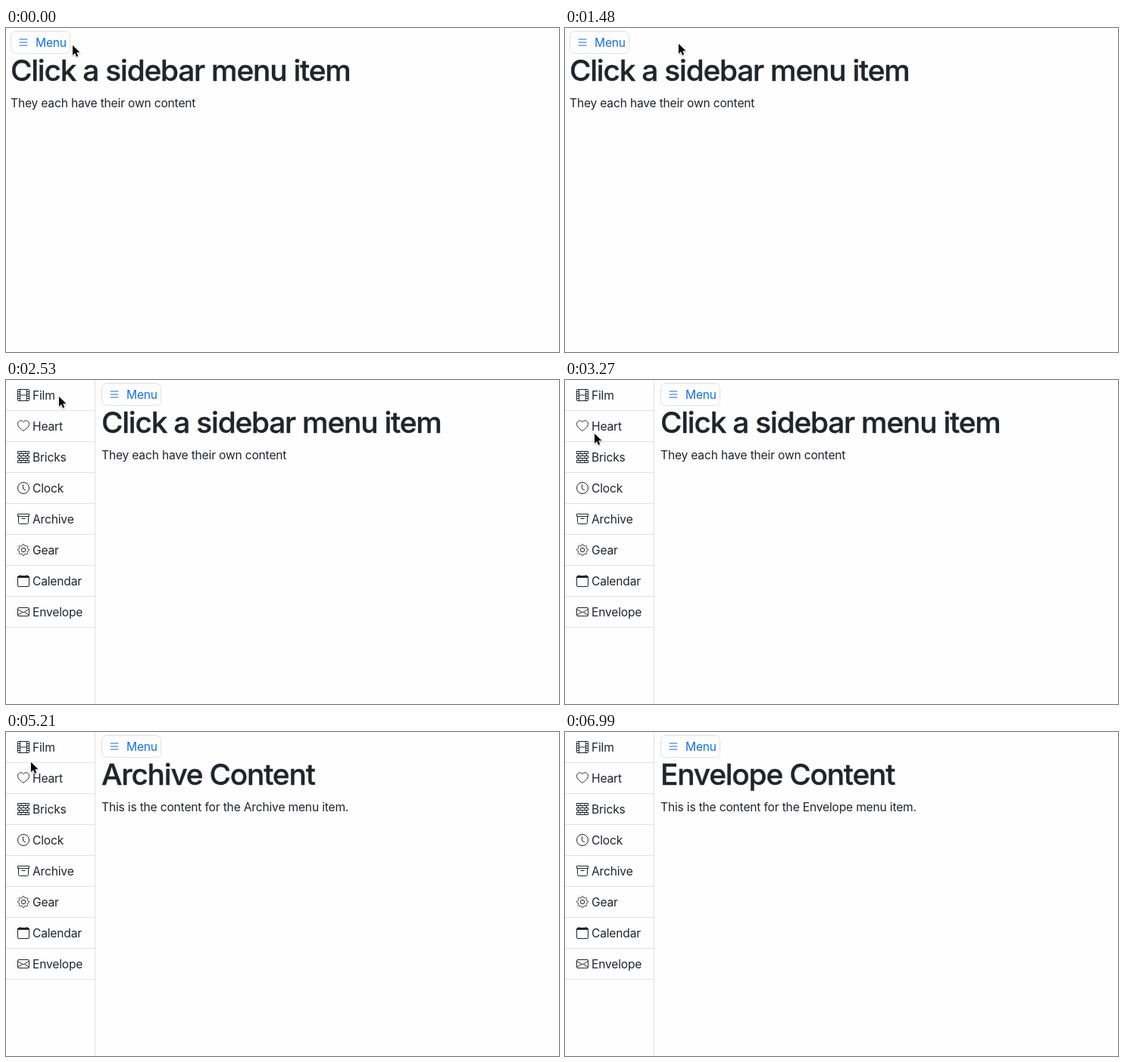
These frames come from a looping animation (730 by 429 pixels, 8190 ms). An HTML page:

```html
<!DOCTYPE html>
<html lang="en">
<head>
<meta charset="utf-8">
<title>Sidebar menu</title>
<style>
  html, body { margin: 0; width: 100%; height: 100%; overflow: hidden; background: #fefefe; }
  svg { display: block; }
  text {
    font: 400 15.55px Inter, "Open Sans", sans-serif;
    font-optical-sizing: none;
    letter-spacing: -.16px;
    fill: #212529;
    white-space: pre;
  }
  #title {
    font-size: 38.8px;
    font-weight: 500;
    letter-spacing: -1.18px;
    stroke: #212529;
    stroke-width: .35;
  }
  .icon { fill: none; stroke: #212529; stroke-width: 1; }
  .rule { fill: none; stroke: #dee2e6; }
  #button text { fill: var(--link); }
  #button .icon { stroke: var(--link); stroke-linecap: round; }
  #pointer { filter: drop-shadow(0 1px 1px rgba(0, 0, 0, .3)); }
  #arrow { fill: #000; stroke: #fff; stroke-width: 1.6; stroke-linejoin: round; paint-order: stroke; }
  #hand { fill: #fff; stroke: #000; stroke-width: 1.1; stroke-linejoin: round; }
  #beam { fill: none; stroke: #000; }
  #beam .halo { stroke: #fff; stroke-width: 2.4; }
</style>
</head>
<body>
<svg width="730" height="429" viewBox="0 0 730 429">
  <g id="sidebar"><path class="rule" d="M117.5 0V429"/></g>
  <g id="page">
    <g id="button">
      <rect class="rule" x="6.5" y="4.5" width="78" height="29" rx="6"/>
      <path class="icon" d="M18 15H28M18 19H28M18 23H28"/>
      <text x="39" y="25">Menu</text>
    </g>
    <text id="title" x="6" y="70"></text>
    <text id="body" x="6" y="105"></text>
  </g>
  <g id="pointer">
    <path id="arrow" transform="scale(.9)" d="M0 0V14.5L3.4 11.3 5.7 16.6 8 15.6 5.8 10.4H10.5Z"/>
    <g id="hand" transform="translate(-4 -1)">
      <path d="M4 10.6L2.6 2.6C2.4.9 4.6.4 5.2 2L6.6 6.6C7 5.6 9 5.7 9.2 7 9.8 6.2 11.4 6.5 11.6 7.7
        12.4 7.1 13.8 7.6 13.8 9 14 12 13.6 13 12.6 14.6V17.5H6.2V16C5 14.6 3.4 12.5 1.2 10.2.4 9 2 8 3 9.2Z"/>
      <path d="M7.2 11V14.5M9.2 11V14.5M11.2 11V14.5"/>
    </g>
    <g id="beam"></g>
  </g>
</svg>
<script>
const LOOP = 8190, STEP = 150, ROW = 41, SHIFT = 120;
const $ = id => document.getElementById(id);

function add(parent, tag, attrs, text = '') {
  const el = document.createElementNS('http://www.w3.org/2000/svg', tag);
  for (const key in attrs) el.setAttribute(key, attrs[key]);
  el.textContent = text;
  return parent.appendChild(el);
}

function gearPath() {
  const pts = [];
  for (let i = 0; i < 96; i++) {
    const a = i / 96 * 2 * Math.PI;
    const r = 6.55 + .9 * Math.max(-1, Math.min(1, 1.5 * Math.cos(8 * a)));
    pts.push((8 + r * Math.cos(a)).toFixed(2) + ' ' + (8 + r * Math.sin(a)).toFixed(2));
  }
  return 'M' + pts.join('L') + 'ZM10.7 8a2.7 2.7 0 1 1-5.4 0a2.7 2.7 0 1 1 5.4 0Z';
}

const rungs = x => [3.5, 6.5, 9.5, 12.5].map(y => `M${x} ${y}h3`).join('');
const bricks = [0.5, 6.5, 12.5].map(y => `M.5 ${y}h15v3H.5ZM5 ${y}v3M11 ${y}v3`).join('') +
  [3.5, 9.5].map(y => `M2.5 ${y}v3M8 ${y}v3M13.5 ${y}v3`).join('');

// Icons live in a 16 by 16 box and are drawn with a 1px stroke.
const items = {
  Film: 'M1 .5h14l.5.5v14l-.5.5H1L.5 15V1ZM3.5.5v15M12.5.5v15M3.5 8h9' + rungs(.5) + rungs(12.5),
  Heart: 'M8 2.75C5.6-.9.5.6.5 5.3c0 3.6 4 6.6 7.5 9.1 3.5-2.5 7.5-5.5 7.5-9.1C15.5.6 10.4-.9 8 2.75Z',
  Bricks: bricks,
  Clock: 'M15.5 8a7.5 7.5 0 1 1-15 0a7.5 7.5 0 1 1 15 0ZM7.5 3.5V9l3.5 2',
  Archive: 'M.5 1.5h15v3H.5ZM1.5 4.5v8a2 2 0 0 0 2 2h9a2 2 0 0 0 2-2v-8M5.5 7.5h5',
  Gear: gearPath(),
  Calendar: 'M2 1.5h12a1.5 1.5 0 0 1 1.5 1.5v11a1.5 1.5 0 0 1-1.5 1.5H2A1.5 1.5 0 0 1 .5 14V3A1.5 1.5 0 0 1 2 1.5Z' +
    'M1 2.5h14M.5 3.5h15M3.5 0v1.5M12.5 0v1.5',
  Envelope: 'M2 2.5h12A1.5 1.5 0 0 1 15.5 4v8a1.5 1.5 0 0 1-1.5 1.5H2A1.5 1.5 0 0 1 .5 12V4A1.5 1.5 0 0 1 2 2.5Z' +
    'M.5 4.5L8 9l7.5-4.5M.8 12.2l5.8-3.6M15.2 12.2L9.4 8.6'
};
const names = Object.keys(items);

names.forEach((name, i) => {
  const row = add($('sidebar'), 'g', { transform: `translate(0 ${i * ROW})` });
  add(row, 'path', { class: 'icon', d: items[name], transform: 'translate(15 12)' });
  add(row, 'text', { x: 35, y: 26 }, name);
  add(row, 'path', { class: 'rule', d: 'M0 40.5H117' });
});

const beam = 'M-3-7.5Q0-7.5 0-5V5Q0 7.5-3 7.5M3-7.5Q0-7.5 0-5M0 5Q0 7.5 3 7.5M-1.5 2.5h3';
add($('beam'), 'path', { class: 'halo', d: beam });
add($('beam'), 'path', { d: beam });

// Pointer moves: start, end, then a curve from, control, to.
const moves = [
  [0, 0, [88, 23], [88, 23], [88, 23]],
  [150, 300, [81, 23], [78, 23], [75, 23]],
  [600, 1040, [70, 22], [110, 28], [150, 21]],
  [1480, 2230, [150, 21], [110, 26], [75, 23]],
  [2530, 3270, [70, 22], [62, 50], [39, 71]],
  [3570, 4310, [39, 71], [46, 120], [49.5, 178]],
  [4610, 5210, [49.5, 178], [25, 100], [33, 40]],
  [5210, 5510, [33, 40], [36, 18], [46, 12]],
  [5660, 6250, [46, 12], [56, 160], [68, 305]],
  [6700, 6990, [68, 305], [666, 412], [560, 520]]
];
const clicks = [[3570, 'Heart'], [4610, 'Archive'], [5660, 'Film'], [6700, 'Envelope']];

const latest = (list, t) => list.filter(entry => t >= entry[0]).pop();

function pointerAt(t) {
  const [start, end, a, b, c] = latest(moves, t);
  const raw = t >= end ? 1 : Math.floor((t - start) / STEP) / Math.round((end - start) / STEP);
  const p = raw * raw * (3 - 2 * raw), q = 1 - p;
  return a.map((v, i) => q * q * v + 2 * q * p * b[i] + p * p * c[i]);
}

function overLabel(x, y) {
  return names.some((name, i) =>
    x >= 35 && x <= 35 + name.length * 8.2 && Math.abs(y - 20 - i * ROW) <= 9);
}

const show = (id, on) => { $(id).style.display = on ? '' : 'none'; };

function setText(id, value) {
  if ($(id).textContent !== value) $(id).textContent = value;
}

function draw(t) {
  const open = t >= 600 && t < 1480 || t >= 2530;
  const shift = open ? SHIFT : 0;
  const [x, y] = pointerAt(t);
  const onButton = x >= 6 + shift && x <= 85 + shift && y >= 5 && y <= 34;
  const onLabel = open && overLabel(x, y);
  const click = latest(clicks, t);

  show('sidebar', open);
  $('page').setAttribute('transform', `translate(${shift} 0)`);
  $('button').style.setProperty('--link', onButton ? '#0a58ca' : '#0d6efd');
  setText('title', click ? `${click[1]} Content` : 'Click a sidebar menu item');
  setText('body', click ? `This is the content for the ${click[1]} menu item.` : 'They each have their own content');

  $('pointer').setAttribute('transform', `translate(${x} ${y})`);
  show('hand', onButton);
  show('beam', onLabel);
  show('arrow', !onButton && !onLabel);
}

const begin = performance.now();
function tick() {
  draw((performance.now() - begin) % LOOP);
  requestAnimationFrame(tick);
}
tick();
</script>
</body>
</html>
```
